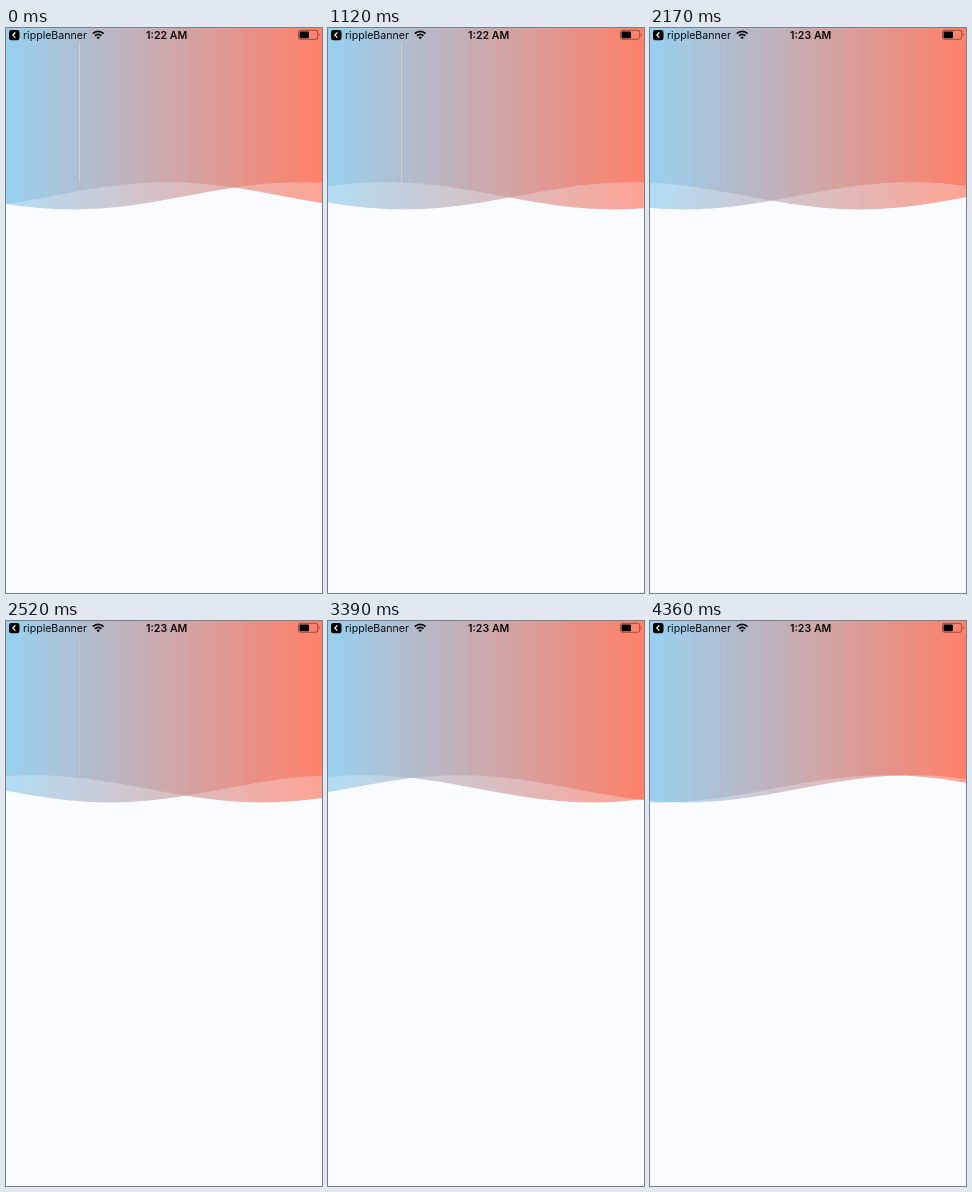
An HTML page for the animation above (4.46 s loop, 316 by 565 pixels).

```html
<!DOCTYPE html>
<html lang="en">
<head>
<meta charset="utf-8">
<title>Wave header</title>
<style>
  html, body { margin: 0; width: 100%; height: 100%; overflow: hidden; background: #f9fbff; }
  svg { display: block; width: 316px; height: 565px; }
  text { font-family: Inter, "Liberation Sans", sans-serif; fill: #0b0b0d; }
</style>
</head>
<body>
<svg viewBox="0 0 316 565">
  <defs>
    <linearGradient id="sky" gradientUnits="userSpaceOnUse" x1="0" y1="0" x2="316" y2="0"></linearGradient>
  </defs>
  <path id="veil" fill="url(#sky)" opacity=".72"/>
  <path id="body" fill="url(#sky)"/>
  <rect id="seam" x="73" y="14" width="1" height="140" fill="#fff" opacity=".3"/>

  <!-- status bar -->
  <rect x="3" y="2" width="10.5" height="10.3" rx="2.4"/>
  <path d="M9.4 4.5 6.8 7.1l2.6 2.6" fill="none" stroke="#fff" stroke-width="1.2"/>
  <text id="app" x="17" y="10.6" font-size="10.6">rippleBanner</text>
  <g fill="none" stroke="#0b0b0d" stroke-width="1.8">
    <path d="M86.8 5.6a7.5 7.5 0 0 1 10.8 0"/>
    <path d="M89 7.8a4.5 4.5 0 0 1 6.4 0"/>
  </g>
  <path d="M92.2 11.2 90.4 9.3a2.6 2.6 0 0 1 3.6 0z"/>
  <text id="clock" x="160.7" y="10.6" font-size="10.6" font-weight="600" text-anchor="middle">1:22 AM</text>
  <rect x="292.5" y="2.3" width="19.2" height="9" rx="2" fill="none" stroke="#000" stroke-opacity=".45" stroke-width=".9"/>
  <rect x="293.6" y="3.4" width="9.4" height="6.8" rx="1"/>
  <path d="M312.9 5.3q1.5 1.5 0 3z" opacity=".6"/>
</svg>
<script>
  const WIDTH = 316, LOOP = 4460, PERIOD = 456, MID = 167.8, AMP = 13.6, BAND = 14;
  const $ = id => document.getElementById(id);

  // Banded horizontal gradient
  const left = [151, 209, 240], right = [255, 128, 105];
  let stops = '';
  for (let x = 0; x < WIDTH; x += BAND) {
    const end = Math.min(x + BAND, WIDTH), mix = (x + end) / 2 / WIDTH;
    const rgb = left.map((c, i) => Math.round(c + (right[i] - c) * mix));
    for (const edge of [x, end])
      stops += `<stop offset="${edge / WIDTH}" stop-color="rgb(${rgb})"/>`;
  }
  $('sky').innerHTML = stops;

  // Step times: [first, last, count]
  const runs = [[50, 530, 9], [590, 1060, 9], [1120, 1640, 10], [1700, 2220, 10],
                [2280, 2760, 9], [2810, 3280, 9], [3340, 3810, 9], [3870, 4220, 7]];
  const steps = [0];
  for (const [a, b, n] of runs)
    for (let i = 0; i < n; i++) steps.push(Math.round((a + (b - a) * i / (n - 1)) / 10) * 10);
  steps.push(4360);

  const wave = (x, trough) => MID + AMP * Math.cos((x - trough) * 2 * Math.PI / PERIOD);

  function area(edge) {
    let d = 'M0 0';
    for (let x = 0; x <= WIDTH; x += 2) d += `L${x} ${edge(x).toFixed(2)}`;
    return d + `L${WIDTH} 0Z`;
  }

  let shown = -1;
  function draw() {
    const now = performance.now() % LOOP;
    const t = steps.filter(s => s <= now).pop();
    if (t !== shown) {
      shown = t;
      const a = 67.3 + 0.19555 * t, b = 389.3 + 0.12785 * t;
      $('veil').setAttribute('d', area(x => Math.max(wave(x, a), wave(x, b))));
      $('body').setAttribute('d', area(x => Math.min(wave(x, a), wave(x, b))));
      const late = t >= 1930;
      $('clock').textContent = late ? '1:23 AM' : '1:22 AM';
      $('seam').setAttribute('opacity', late ? 0.1 : 0.3);
    }
    requestAnimationFrame(draw);
  }
  draw();
</script>
</body>
</html>
```
